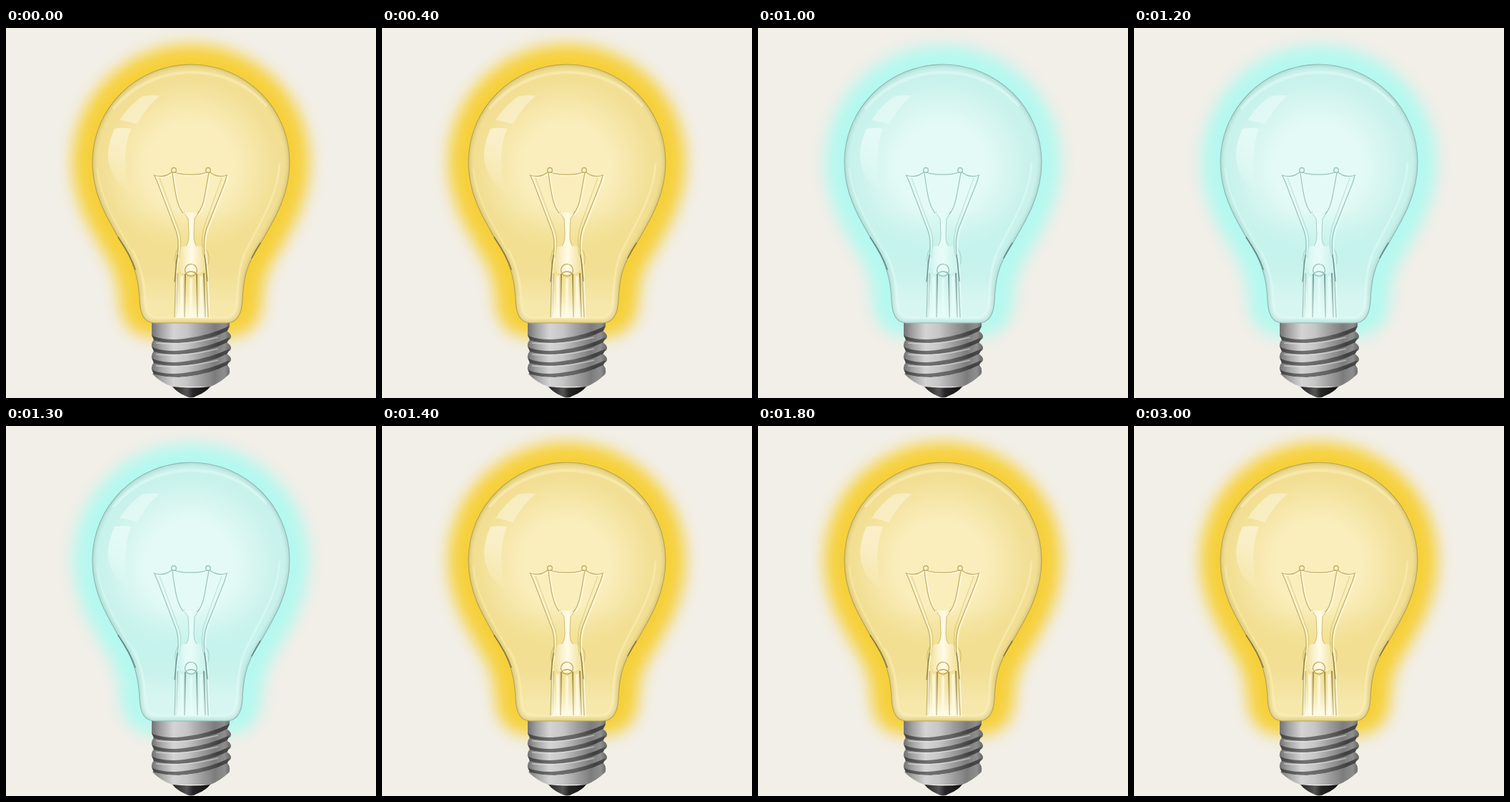
Write an HTML page that moves like this. It is 518x518 px and loops after 5 s.

```html
<!DOCTYPE html>
<html lang="en">
<head>
<meta charset="utf-8">
<title>Flickering bulb</title>
<style>
html, body { margin: 0; width: 100%; height: 100%; overflow: hidden; background: #f2efe8; }
svg { display: block; width: 100vw; height: 100vh; animation: flicker 5s step-end infinite; }

/* warm and cool light */
@keyframes flicker {
  0%, 28%, 36% {
    --glow: #f6d03a; --spread: 56px; --core: #faeebd; --mid: #f6e7aa; --edge: #f2df94;
    --neck: #f2df8f; --line: #b8a552; --dark: #6f6328; --shine: #faf0cb; --rim: #faefb9; --white: #fffbe8;
  }
  20%, 30% {
    --glow: #b4f8ef; --spread: 54px; --core: #e4faf6; --mid: #d8f6f1; --edge: #c9f2ec;
    --neck: #c4f4ed; --line: #8fb9b4; --dark: #4c6f6b; --shine: #e5faf7; --rim: #e2fbf7; --white: #e6fcf8;
  }
}
.glow { fill: var(--glow); stroke: var(--glow); stroke-width: var(--spread); stroke-linejoin: round; }
.line, .lit { fill: none; stroke: var(--line); stroke-width: 1.2; stroke-linecap: round; stroke-linejoin: round; }
.lit { stroke: var(--white); stroke-width: 2; stroke-opacity: .75; }
.dark { fill: none; stroke: var(--dark); stroke-linecap: round; }
.rim { fill: none; stroke: var(--rim); stroke-linecap: round; }
.shine { fill: var(--shine); }
.core { stop-color: var(--core); }
.mid { stop-color: var(--mid); }
.edge { stop-color: var(--edge); }
.neck { stop-color: var(--neck); }
.pale { stop-color: var(--shine); }
.white { stop-color: var(--white); }
.deep { stop-color: var(--dark); }
</style>
</head>
<body>
<svg viewBox="0 0 518 518">
  <defs>
    <path id="glass" d="M259 51C335 51 397 112 397 188C397 239 371 276 346 319C335 339 332 358 331 382C330 401 324 413 308 413H209C193 413 188 401 187 381C186 356 180 334 171 317C149 277 121 241 121 188C121 112 183 51 259 51Z"/>
    <clipPath id="inside"><use href="#glass"/></clipPath>
    <filter id="haze" x="0" y="0" width="518" height="518" filterUnits="userSpaceOnUse" color-interpolation-filters="sRGB">
      <feGaussianBlur stdDeviation="10.5"/>
    </filter>
    <filter id="soft" x="0" y="0" width="518" height="518" filterUnits="userSpaceOnUse" color-interpolation-filters="sRGB">
      <feGaussianBlur stdDeviation="2"/>
    </filter>
    <radialGradient id="light" gradientUnits="userSpaceOnUse" cx="257" cy="194" r="150">
      <stop class="core" offset="0"/><stop class="core" offset=".4"/>
      <stop class="mid" offset=".6"/><stop class="edge" offset=".82"/><stop class="edge" offset="1"/>
    </radialGradient>
    <linearGradient id="lower" gradientUnits="userSpaceOnUse" x1="0" y1="255" x2="0" y2="413">
      <stop class="neck" offset="0" stop-opacity="0"/><stop class="neck" offset=".36" stop-opacity=".7"/>
      <stop class="edge" offset=".55"/><stop class="mid" offset=".82"/><stop class="mid" offset="1"/>
    </linearGradient>
    <linearGradient id="pane" gradientUnits="userSpaceOnUse" x1="0" y1="140" x2="0" y2="235">
      <stop class="pale" offset="0"/><stop class="pale" offset=".4" stop-opacity=".75"/><stop class="pale" offset="1" stop-opacity="0"/>
    </linearGradient>
    <linearGradient id="tube" x1="0" y1="0" x2="0" y2="1">
      <stop class="edge" offset="0"/><stop class="mid" offset=".45"/><stop class="white" offset="1"/>
    </linearGradient>
    <linearGradient id="streak" gradientUnits="userSpaceOnUse" x1="0" y1="335" x2="0" y2="406">
      <stop class="deep" offset="0" stop-opacity=".75"/><stop class="deep" offset=".45" stop-opacity=".5"/>
      <stop class="deep" offset="1" stop-opacity=".25"/>
    </linearGradient>
    <linearGradient id="stem" x1="0" y1="0" x2="1" y2="0">
      <stop class="neck" offset="0"/><stop class="pale" offset=".3"/>
      <stop class="white" offset=".5"/><stop class="edge" offset="1"/>
    </linearGradient>
    <linearGradient id="metal" gradientUnits="userSpaceOnUse" x1="203" y1="0" x2="315" y2="0">
      <stop offset="0" stop-color="#6e6e6e"/><stop offset=".12" stop-color="#a2a2a2"/>
      <stop offset=".28" stop-color="#d4d4d4"/><stop offset=".45" stop-color="#c6c6c6"/>
      <stop offset=".62" stop-color="#a0a0a0"/><stop offset=".8" stop-color="#7c7c7c"/>
      <stop offset=".92" stop-color="#8e8e8e"/><stop offset="1" stop-color="#666"/>
    </linearGradient>
    <linearGradient id="groove" gradientUnits="userSpaceOnUse" x1="203" y1="0" x2="315" y2="0">
      <stop offset="0" stop-color="#404040"/><stop offset=".3" stop-color="#707070"/>
      <stop offset=".6" stop-color="#636363"/><stop offset=".85" stop-color="#404040"/><stop offset="1" stop-color="#4c4c4c"/>
    </linearGradient>
    <linearGradient id="shade" x1="0" y1="0" x2="0" y2="1">
      <stop offset="0" stop-color="#444" stop-opacity="0"/><stop offset="1" stop-color="#444" stop-opacity=".6"/>
    </linearGradient>
    <linearGradient id="tip" x1="0" y1="0" x2="1" y2="0">
      <stop offset="0" stop-color="#222"/><stop offset=".38" stop-color="#555"/>
      <stop offset=".55" stop-color="#252525"/><stop offset="1" stop-color="#111"/>
    </linearGradient>
    <g id="thread">
      <path fill="url(#metal)" d="M207 436Q203 441 204 446Q206 450 211 451Q270 450 309 438Q315 436 315 432Q315 428 309 424Z"/>
      <path fill="url(#groove)" d="M204 430Q214 436 238 436Q280 433 313 417L310 424Q280 439 242 441Q218 441 207 437Z"/>
      <path fill="none" stroke="#eee" stroke-opacity=".5" stroke-width="1.5" d="M210 441Q250 445 297 433"/>
    </g>
    <path id="wires" d="M207 206Q222 211 233 201Q245 206 259 205Q272 206 284 201Q296 211 310 206M208 207L212 216L238 284Q244 302 238 331L236 405M309 207L306 217L281 280Q274 301 280 331L283 405M233 203C236 226 239 249 248 259M284 203C279 226 278 250 268 260"/>
  </defs>

  <rect width="518" height="518" fill="#f2efe8"/>
  <path class="glow" filter="url(#haze)" d="M259 51C335 51 397 112 397 188C397 239 371 276 346 319C335 339 332 358 331 382C330 398 324 405 308 405H209C193 405 188 398 187 381C186 356 180 334 171 317C149 277 121 241 121 188C121 112 183 51 259 51Z"/>

  <!-- screw base -->
  <path fill="url(#metal)" d="M204 411H313V418L309 424V485Q298 496 286 502H233Q217 496 206 485L208 436L204 431Z"/>
  <use href="#thread"/>
  <use href="#thread" y="16"/>
  <use href="#thread" y="32"/>
  <path fill="url(#groove)" d="M204 478Q214 484 238 484Q280 481 313 465L310 472Q280 487 242 489Q218 489 207 485Z"/>
  <path id="cone" fill="url(#metal)" d="M205 484Q220 489 242 489Q280 487 310 472Q315 478 312 485Q299 497 286 502H233Q216 496 205 484Z"/>
  <use href="#cone" style="fill:url(#shade)"/>
  <path fill="url(#tip)" d="M233 502Q259 505 286 502Q280 510 267 515Q259 520 251 515Q239 510 233 502Z"/>

  <!-- glass -->
  <use href="#glass" fill="url(#light)"/>
  <use href="#glass" fill="url(#lower)"/>
  <g clip-path="url(#inside)">
    <use href="#glass" class="line" style="stroke-width:6;stroke-opacity:.4" filter="url(#soft)"/>
    <path class="rim" stroke-width="4" stroke-opacity=".6" d="M151 112C204 49 306 43 364 108"/>
    <path class="rim" stroke-width="3" stroke-opacity=".6" d="M383 190C381 237 350 281 334 316C325 337 325 360 323 383C322 397 317 404 306 405H213C200 405 196 397 195 380C194 353 187 329 177 311"/>
    <path class="rim" stroke-width="2" stroke-opacity=".5" d="M128 198C132 240 157 278 174 309"/>
  </g>
  <use href="#glass" class="line"/>
  <path class="dark" stroke-width="1.5" stroke-opacity=".75" d="M157 293Q174 317 181 338M356 301Q350 310 344 322"/>

  <!-- reflections -->
  <path class="shine" opacity=".8" d="M190 96Q202 93 215 95Q196 111 183 135Q171 130 159 129Q171 110 190 96Z"/>
  <path fill="url(#pane)" d="M152 141Q163 139 175 141Q160 181 173 230Q155 220 147 199Q137 174 152 141Z"/>

  <!-- stem -->
  <path fill="url(#tube)" d="M238 342H281L283 406H235Z"/>
  <path class="lit" style="stroke-width:4" d="M246 349V404M259 352V404M273 349L274 404"/>
  <path fill="none" stroke="url(#streak)" stroke-width="2" d="M240 343L238 405M251 345L250 405M267 345L268 405M277 343L279 405"/>
  <path fill="url(#stem)" d="M249 257Q259 260 270 257Q268 262 264 267L263 290Q263 302 267 305Q278 306 280 312V337Q273 345 259 345Q245 345 239 337V313Q242 306 252 305Q256 301 256 288L255 267Q250 262 249 257Z"/>
  <path class="line" style="stroke-width:1;stroke-opacity:.65" d="M270 257Q268 262 264 267L263 290Q263 302 267 305M249 257Q250 262 255 267L256 288Q256 301 252 305M241 308Q232 323 241 338M278 307Q289 318 281 337"/>
  <circle class="line" cx="259" cy="339" r="8.5"/>
  <path class="line" d="M250 345Q259 337 268 345"/>

  <!-- filament -->
  <use href="#wires" class="lit" x="1.8" y="1"/>
  <use href="#wires" class="line" style="stroke-opacity:.85"/>
  <path class="line" style="stroke-width:1;stroke-opacity:.45" d="M215 210L243 286Q247 298 242 322M302 210L277 279Q272 296 276 318"/>
  <path class="dark" stroke-width="1.5" stroke-opacity=".6" d="M240 318Q238 333 236 355M278 318Q280 333 282 354"/>
  <g class="line">
    <circle class="shine" cx="235" cy="199" r="3.3"/>
    <circle class="shine" cx="283" cy="199" r="3.3"/>
  </g>
</svg>
</body>
</html>
```
